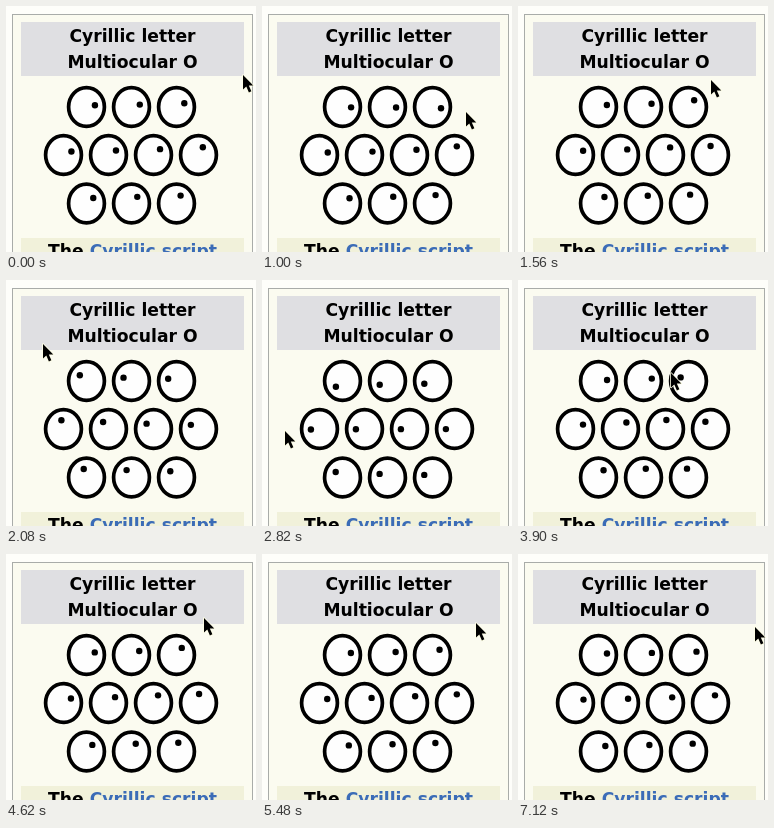
An HTML page that plays this animation: 250 by 246 pixels, repeating every 7220 ms.

```html
<!DOCTYPE html>
<html lang="en">
<head>
<meta charset="utf-8">
<title>Multiocular O</title>
<style>
  html, body { margin: 0; width: 100%; height: 100%; overflow: hidden; background: #fefefa; }
  svg { display: block; width: 250px; height: 246px; }
  text { font: bold 17.2px "DejaVu Sans", sans-serif; text-anchor: middle; }
  .eye { fill: #fefefe; stroke: #000; stroke-width: 3.7; }
  .link { fill: #3b6cb7; }
</style>
</head>
<body>
<svg viewBox="0 0 250 246">
  <rect x="6.5" y="8.5" width="240" height="260" fill="#fbfbf0" stroke="#a9aca9"/>
  <rect x="15" y="16" width="223" height="54" fill="#dfdfe2"/>
  <rect x="15" y="232" width="223" height="30" fill="#f1f1da"/>
  <text x="126.5" y="36">Cyrillic letter</text>
  <text x="126.5" y="62">Multiocular O</text>
  <text x="126.5" y="251">The <tspan class="link">Cyrillic script</tspan></text>
  <g id="eyes"></g>
  <path id="cursor" d="M0 0V14.5L3.3 11.4L5.9 17.4L8.4 16.3L5.8 10.5H10.3Z"
        stroke="#ffffe6" stroke-width="1.6" paint-order="stroke" stroke-linejoin="round"/>
</svg>
<script>
const LOOP = 7220, BEAT = 140;
const REACH_X = 8.6, REACH_Y = 9;

// Pointer path: step, x, y
const path = [
  [0, 237, 69], [11, 226, 88], [22, 204, 106], [34, 193, 74], [44, 37, 64],
  [49, 31, 65], [61, 23, 151], [66, 36, 182], [72, 84, 195], [77, 145, 185],
  [81, 162, 115], [83, 153, 93], [90, 166, 68], [99, 198, 64], [110, 216, 52],
  [118, 214, 69], [135, 227, 72], [147, 237, 73], [152, 237, 73]
];

const rows = [[101, 80, 3], [149, 57, 4], [197.5, 80, 3]];
const eyeGroup = document.getElementById('eyes');
const cursor = document.getElementById('cursor');

function add(name, attrs) {
  const el = document.createElementNS('http://www.w3.org/2000/svg', name);
  for (const key in attrs) el.setAttribute(key, attrs[key]);
  return eyeGroup.appendChild(el);
}

const eyes = rows.flatMap(([y, left, count]) =>
  Array.from({ length: count }, (_, i) => {
    const x = left + 0.5 + i * 45;
    add('ellipse', { class: 'eye', cx: x, cy: y, rx: 17.9, ry: 19.3 });
    return { x, y, pupil: add('circle', { r: 3.2 }) };
  }));

// The picture holds for 20, 100 and 20 ms in every beat.
function stepAt(ms) {
  const rest = ms % BEAT;
  return 3 * Math.floor(ms / BEAT) + (rest < 20 ? 0 : rest < 120 ? 1 : 2);
}

function slope(i, axis) {
  const a = path[Math.max(i - 1, 0)], b = path[Math.min(i + 1, path.length - 1)];
  const p = path[i];
  // Flat at turning points, so the path never overshoots
  if ((p[axis] - a[axis]) * (b[axis] - p[axis]) <= 0) return 0;
  return (b[axis] - a[axis]) / (b[0] - a[0]);
}

function pointerAt(step) {
  let i = 0;
  while (i < path.length - 2 && path[i + 1][0] <= step) i++;
  const a = path[i], b = path[i + 1], span = b[0] - a[0];
  const u = Math.min((step - a[0]) / span, 1), v = 1 - u;
  return [1, 2].map(axis =>
    v * v * (1 + 2 * u) * a[axis] + u * u * (3 - 2 * u) * b[axis] +
    u * v * span * (v * slope(i, axis) - u * slope(i + 1, axis)));
}

function draw(ms) {
  const [px, py] = pointerAt(stepAt(ms));
  cursor.setAttribute('transform', `translate(${px} ${py})`);
  for (const { x, y, pupil } of eyes) {
    const dx = px - x, dy = py - y;
    const scale = Math.max(Math.hypot(dx / REACH_X, dy / REACH_Y), 1);
    pupil.setAttribute('cx', x + dx / scale);
    pupil.setAttribute('cy', y + dy / scale);
  }
}

const start = performance.now();
function tick() {
  draw((performance.now() - start) % LOOP);
  requestAnimationFrame(tick);
}
tick();
</script>
</body>
</html>
```
